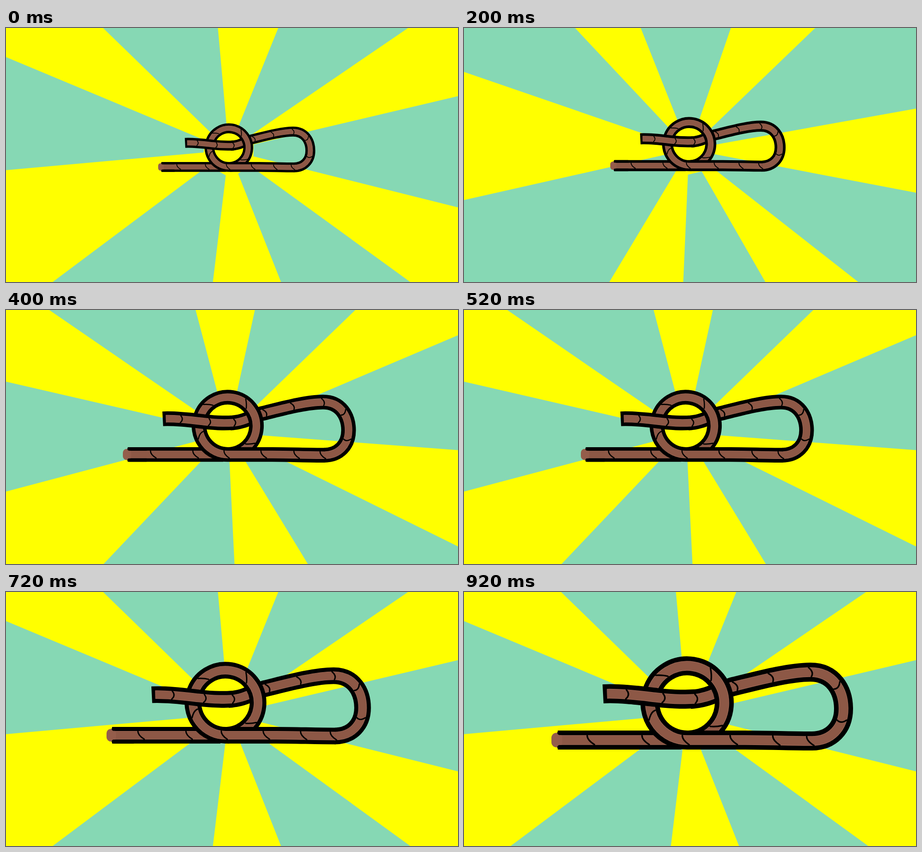
These frames come from a looping animation (998 by 561 pixels, 1 s). An HTML page:

```html
<!DOCTYPE html>
<html lang="en">
<head>
<meta charset="utf-8">
<title>Rope knot on a sunburst</title>
<style>
  html, body { margin: 0; width: 100%; height: 100%; overflow: hidden; background: #ff0; }
  svg { display: block; width: 100%; height: 100%; }
  path { fill: none; stroke: #000; }
  .edge { stroke-width: 42; }
  .rim { stroke: #a26b58; stroke-width: 21.5; }
  .core { stroke: #8d5846; stroke-width: 19.5; }
  .mark { stroke-width: 3.4; stroke-linecap: round; }
  .bar { stroke-width: 10; stroke-linecap: round; }
</style>
</head>
<body>
<svg viewBox="0 0 998 561" preserveAspectRatio="none">
  <rect width="998" height="561" fill="#ff0"/>
  <g id="burst" fill="#86d8b4"></g>
  <g id="rope"></g>
</svg>
<script>
const burst = document.getElementById('burst');
const rope = document.getElementById('rope');

function add(parent, tag, attrs) {
  const el = document.createElementNS('http://www.w3.org/2000/svg', tag);
  for (const k in attrs) el.setAttribute(k, attrs[k]);
  return parent.appendChild(el);
}

// Green rays around a yellow hub: start and end angle in degrees.
const hub = { x: 492, y: 270, r: 56 };
const rays = [[-13.3, 14], [36, 68.4], [96.9, 143.2], [174.9, 202.7], [224.2, 264.9], [292, 325.7]];

function polar(deg, r) {
  const a = deg * Math.PI / 180;
  return [hub.x + r * Math.cos(a), hub.y + r * Math.sin(a)];
}

for (const [a, b] of rays)
  add(burst, 'polygon', {
    points: [polar(a, hub.r), polar(a, 1200), polar(b, 1200), polar(b, hub.r)].join(' ')
  });

// A curved line across the strand, slanted by lean and bowed by bow.
function mark(path, at, lean, bow) {
  const p = path.getPointAtLength(at), q = path.getPointAtLength(at - 1);
  const ux = p.x - q.x, uy = p.y - q.y;
  const point = (along, across) => [p.x + along * ux - across * uy, p.y + along * uy + across * ux];
  add(rope, 'path', {
    class: 'mark',
    d: `M${point(-lean, -10)}Q${point(bow, 0)} ${point(lean, 10)}`
  });
}

// Black outline, brown core from skip onwards, then marks at the given lengths.
function strand(d, { marks, lean, bow, skip = 0 }) {
  const path = add(rope, 'path', { class: 'edge', d });
  const dash = { 'stroke-dasharray': skip ? `0 ${skip} 2000` : 'none' };
  add(rope, 'path', { class: 'rim', d, ...dash });
  add(rope, 'path', { class: 'core', d, ...dash });
  for (const at of marks) mark(path, at, lean, bow);
}

// Back to front: tail, bight, right of the ring, ring into base, loose end.
add(rope, 'circle', { cx: 493, cy: 245, r: 82, fill: '#ff0' });
strand('M207 327H480', { marks: [73, 194], lean: 8, bow: -8 });
add(rope, 'rect', { x: 193, y: 311, width: 24, height: 32, rx: 11, fill: '#945d4b' });
add(rope, 'path', { class: 'bar', d: 'M211 311H260M211 343H260' });
strand('M500 237C540 235 560 219 590 210C640 198 715 177 765 177C815 177 838 217 838 258C838 300 810 329 768 329',
  { marks: [103, 184, 272, 341, 421], lean: 3, bow: 9 });
strand('M414 222A82 82 0 1 1 497 327', { marks: [44, 162, 289], lean: 9, bow: 3 });
strand('M414 222A82 82 0 0 0 493 327H620C670 327 720 329 770 329',
  { marks: [51, 149, 255, 349, 424], lean: 8, bow: -8 });
strand('M307 225C345 223 390 229 425 233C470 238 490 237 512 236',
  { marks: [51, 132, 204], lean: 0, bow: 10, skip: 9 });

// Rope placement (x, y, scale) and burst angle from a given time on.
const small = [235.4, 136.5, 0.521], medium = [210.8, 113.9, 0.5813];
const steps = [
  { at: 0, turn: 0, place: small },
  { at: 100, turn: 7.5, place: small },
  { at: 200, turn: 24.1, place: medium },
  { at: 300, turn: 37.8, place: medium },
  { at: 400, turn: -9.7, place: [108.9, 66.5, 0.7726] },
  { at: 600, turn: 0, place: [52.8, 29.7, 0.8765] },
  { at: 800, turn: 0, place: [0, 0, 1] }
];

function draw(ms) {
  const { turn, place: [x, y, scale] } = steps.findLast(s => s.at <= ms);
  burst.setAttribute('transform', `rotate(${turn} 499 280.5)`);
  rope.setAttribute('transform', `translate(${x} ${y}) scale(${scale})`);
}

const start = performance.now();
function tick() {
  draw((performance.now() - start) % 1000);
  requestAnimationFrame(tick);
}
tick();
</script>
</body>
</html>
```
